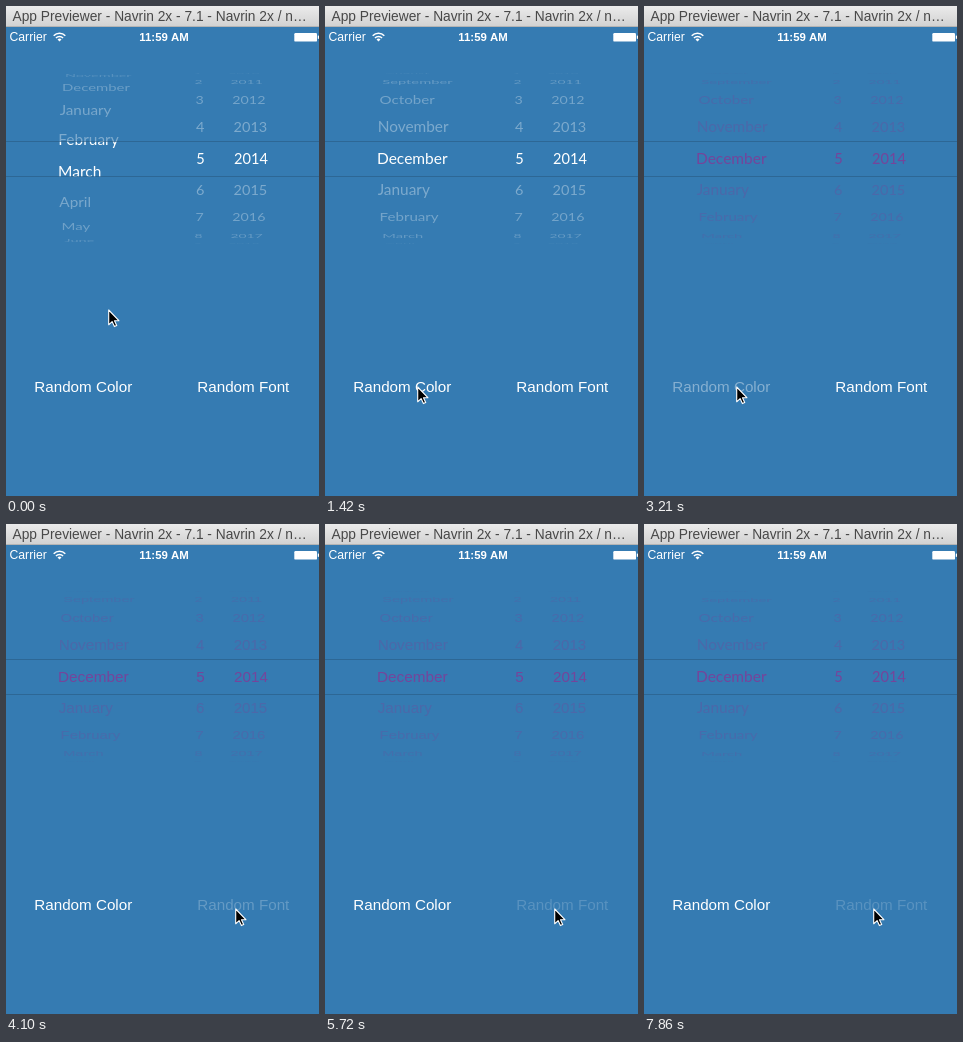
These frames come from a looping animation (313x490 px, 8 s). An HTML page with a canvas:

```html
<!DOCTYPE html>
<html lang="en">
<head>
<meta charset="utf-8">
<title>Date picker</title>
<style>
  html, body { margin: 0; width: 100%; height: 100%; overflow: hidden; background: #357bb2; }
  canvas { display: block; width: 313px; height: 490px; }
</style>
</head>
<body>
<canvas id="stage" width="313" height="490"></canvas>
<script>
const ctx = document.getElementById('stage').getContext('2d');
const LOOP = 8000, W = 313, H = 490;
const SANS = '"Liberation Sans", Arial, sans-serif';
const ROUND = 'Lato, "Open Sans", sans-serif';
const MONTHS = ['January', 'February', 'March', 'April', 'May', 'June', 'July',
  'August', 'September', 'October', 'November', 'December'];
const WHEEL = { y: 153, radius: 85, angle: 21.8 * Math.PI / 180, axis: 157 };
const BAND = { top: 136, bottom: 170 };

// Each track lists [start time, value]; a value holds until the next one.
const CURSOR = [[0, [102, 304]], [180, [100, 318]], [360, [96, 350]], [530, [92, 381]],
  [3570, [172, 384]], [3740, [229, 385]]];
const SCROLL_TICKS = [0, 180, 360, 530, 710, 880, 1060, 1240].map(t => [t, t]);
const INK = [[0, '#ffffff'], [2310, '#75459b']];
const FACE = [[0, ROUND], [4100, SANS], [5900, ROUND], [6440, SANS], [6980, ROUND]];

const tap = (time, dim, mid = 0.6) => [[time, dim], [time + 180, mid], [time + 360, 1]];
const COLOR_ALPHA = [[0, 1], ...tap(2310, 0.25), ...tap(3210, 0.4, 0.7)];
const FONT_ALPHA = [[0, 1], ...tap(4100, 0.24), ...tap(4820, 0.18), ...tap(5720, 0.18),
  ...tap(6440, 0.18), ...tap(6980, 0.18), ...tap(7860, 0.18)];

function held(track, t) {
  let value = track[0][1];
  for (const [start, v] of track) if (t >= start) value = v;
  return value;
}

const mod = (n, m) => ((n % m) + m) % m;

// Decelerating spin that snaps onto December.
function monthPosition(t) {
  return t >= 1420 ? -1 : -1 + 2.59 * Math.exp(-held(SCROLL_TICKS, t) / 416);
}

function text(str, x, y, font, color, align = 'left') {
  ctx.font = font;
  ctx.fillStyle = color;
  ctx.textAlign = align;
  ctx.fillText(str, x, y);
}

function drawTitleBar() {
  const shade = ctx.createLinearGradient(0, 0, 0, 20);
  shade.addColorStop(0, '#ebebeb');
  shade.addColorStop(1, '#d2d2d2');
  ctx.fillStyle = shade;
  ctx.fillRect(0, 0, W, 20);
  ctx.fillStyle = '#b4b4b4';
  ctx.fillRect(0, 20, W, 1);
  text('App Previewer - Navrin 2x - 7.1 - Navrin 2x / n…', 6.5, 15, `13.75px ${SANS}`, '#484848');
}

function drawStatusBar() {
  text('Carrier', 3.5, 35.3, `12.2px ${SANS}`, '#fff');
  text('11:59 AM', 158, 35, `bold 11.4px ${SANS}`, '#fff', 'center');

  ctx.strokeStyle = '#fff';
  ctx.lineWidth = 1.6;
  const from = -Math.PI * 0.75, to = -Math.PI * 0.25;
  for (const r of [5, 8.2]) {
    ctx.beginPath();
    ctx.arc(53.5, 35.5, r, from, to);
    ctx.stroke();
  }
  ctx.beginPath();
  ctx.moveTo(53.5, 35.5);
  ctx.arc(53.5, 35.5, 2.8, from, to);
  ctx.fill();

  ctx.beginPath();
  ctx.roundRect(288.3, 27, 22.7, 8.6, 1.2);
  ctx.fill();
  ctx.fillRect(311.8, 29.6, 1.2, 3.2);
}

function drawColumn(position, label, x, align, size, face, ink, inBand) {
  const first = Math.ceil(position - 4.1), last = Math.floor(position + 4.1);
  for (let row = first; row <= last; row++) {
    const turn = (row - position) * WHEEL.angle;
    const depth = Math.cos(turn);
    if (depth <= 0.02) continue;
    const scale = 1 / (1 + 0.09 * (1 - depth));
    ctx.save();
    ctx.globalAlpha = inBand ? 1 : 0.37 * Math.sqrt(depth);
    ctx.translate(WHEEL.axis + (x - WHEEL.axis) * scale, WHEEL.y + WHEEL.radius * Math.sin(turn));
    ctx.scale(scale, depth);
    text(label(row), 0, 5.2, `${size}px ${face}`, ink, align);
    ctx.restore();
  }
}

function drawPicker(t) {
  const face = held(FACE, t), ink = held(INK, t);
  const round = face === ROUND;
  const nameSize = round ? 15.5 : 15.3, numberSize = round ? 14.6 : 15.2;
  const regions = [[65, BAND.top, false], [BAND.top, BAND.bottom, true], [BAND.bottom, 242, false]];
  for (const [top, bottom, inBand] of regions) {
    ctx.save();
    ctx.beginPath();
    ctx.rect(0, top, W, bottom - top);
    ctx.clip();
    drawColumn(monthPosition(t), n => MONTHS[mod(n, 12)], 52, 'left', nameSize, face, ink, inBand);
    drawColumn(5, n => String(mod(n - 1, 31) + 1), 194.5, 'center', numberSize, face, ink, inBand);
    drawColumn(2014, String, 245, 'center', numberSize, face, ink, inBand);
    ctx.restore();
  }
  ctx.fillStyle = 'rgba(0, 0, 0, 0.16)';
  ctx.fillRect(0, BAND.top - 1, W, 1);
  ctx.fillRect(0, BAND.bottom, W, 1);
}

function drawButtons(t) {
  const button = (label, x, alpha) =>
    text(label, x, 386.1, `15.2px ${SANS}`, `rgba(255, 255, 255, ${alpha})`);
  button('Random Color', 28.3, held(COLOR_ALPHA, t));
  button('Random Font', 191.3, held(FONT_ALPHA, t));
}

function drawCursor([x, y]) {
  const arrow = [[0, 0], [0, 14.8], [3.4, 11.6], [5.7, 16.6], [8, 15.6], [5.8, 10.7], [10.2, 10.7]];
  ctx.save();
  ctx.translate(x + 0.7, y);
  ctx.beginPath();
  for (const [px, py] of arrow) ctx.lineTo(px, py);
  ctx.closePath();
  ctx.fillStyle = '#000';
  ctx.fill();
  ctx.strokeStyle = '#fff';
  ctx.lineWidth = 1.1;
  ctx.lineJoin = 'round';
  ctx.stroke();
  ctx.restore();
}

function draw(t) {
  ctx.fillStyle = '#357bb2';
  ctx.fillRect(0, 0, W, H);
  drawTitleBar();
  drawStatusBar();
  drawPicker(t);
  drawButtons(t);
  drawCursor(held(CURSOR, t));
}

const start = performance.now();
function frame() {
  draw((performance.now() - start) % LOOP);
  requestAnimationFrame(frame);
}
frame();
</script>
</body>
</html>
```
